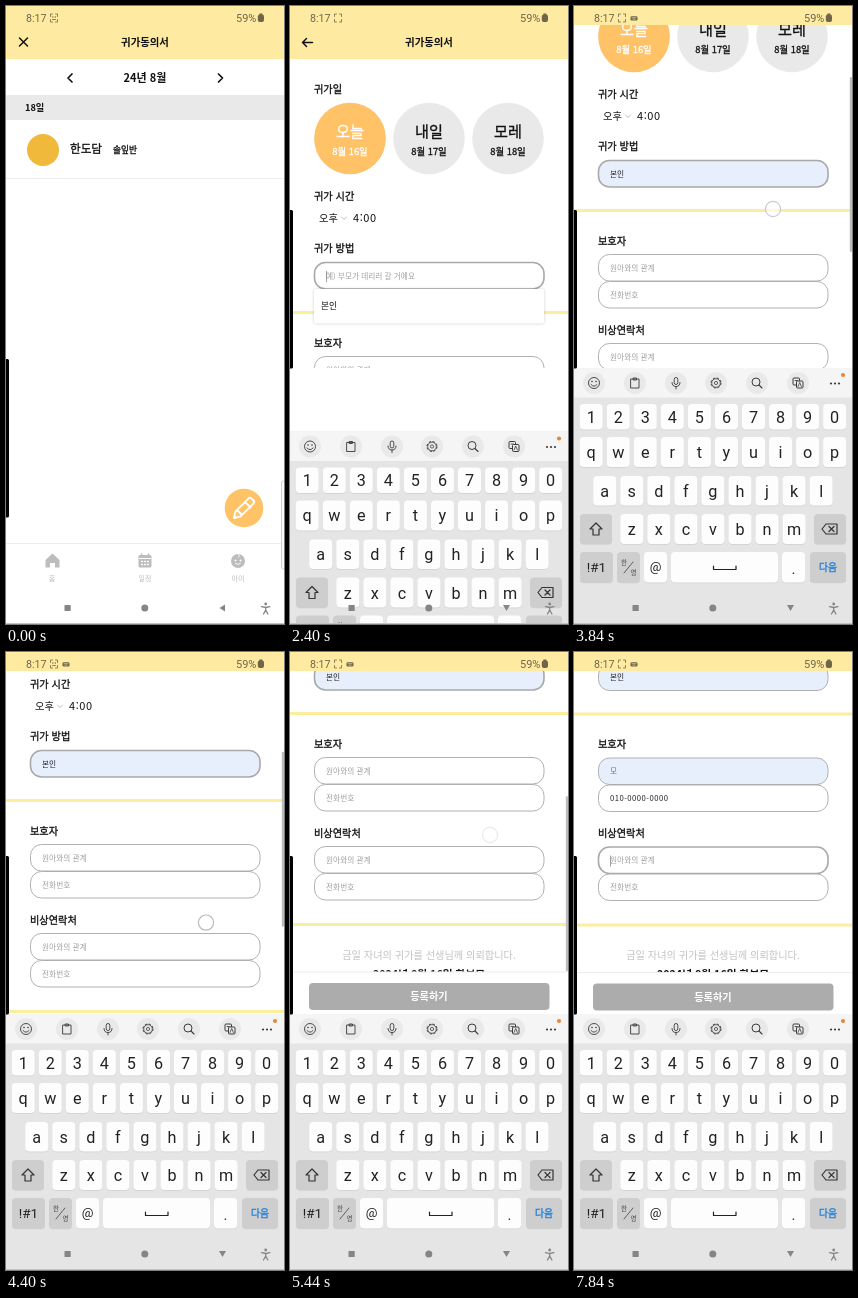
An HTML page that plays this animation: 278 px wide and 618 px high, repeating every 8000 ms.

```html
<!DOCTYPE html>
<html lang="ko">
<head>
<meta charset="utf-8">
<title>귀가동의서</title>
<style>
html, body { margin: 0; width: 278px; height: 618px; overflow: hidden; background: #fff; }
svg { display: block; font-family: "Noto Sans CJK KR", "Noto Sans CJK", "Noto Sans", sans-serif; }
.latin { font-family: Roboto, "Noto Sans CJK KR", sans-serif; }
.line { fill: none; stroke-linecap: round; stroke-linejoin: round; }
</style>
</head>
<body>
<svg id="stage" width="278" height="618" viewBox="0 0 278 618"></svg>
<script>
const LOOP = 8000, STEP = 80;
const YELLOW = '#ffeaa2', ORANGE = '#ffc266', GRAY = '#e9e9e9';

// Markup helpers; text is placed by its vertical centre.
const rect = (x, y, w, h, fill, more = '') =>
  `<rect x="${x}" y="${y}" width="${w}" height="${h}" fill="${fill}" ${more}/>`;
const disc = (x, y, r, fill, more = '') =>
  `<circle cx="${x}" cy="${y}" r="${r}" fill="${fill}" ${more}/>`;
const ring = (x, y, r, color, width = 1, more = '') =>
  disc(x, y, r, 'none', `stroke="${color}" stroke-width="${width}" ${more}`);
const line = (d, color, width = 1, more = '') =>
  `<path class="line" d="${d}" stroke="${color}" stroke-width="${width}" ${more}/>`;
const shape = (d, fill, more = '') => `<path d="${d}" fill="${fill}" ${more}/>`;
const text = (s, x, y, size, fill = '#111', more = '') =>
  `<text x="${x}" y="${(y + size * .37).toFixed(2)}" font-size="${size}" fill="${fill}" ${more}>${s}</text>`;
// Weight between regular and bold.
const medium = (s, x, y, size, fill = '#111', more = '') =>
  text(s, x, y, size, fill, `stroke="${fill}" stroke-width=".3" ${more}`);
const group = (id, body, more = '') => `<g id="${id}" ${more}>${body}</g>`;
const MID = 'text-anchor="middle"', BOLD = 'font-weight="700"';
const MID_BOLD = `${MID} ${BOLD}`;

const header = icon => rect(0, 18, 278, 35, YELLOW) + line(icon, '#111', 1.5) +
  text('귀가동의서', 139, 36, 10.4, '#111', MID_BOLD);

function listPage() {
  const tab = '#bdbdbd';
  return rect(0, 18, 278, 600, '#fff') +
    header('M13.5 32l8 8M21.5 32l-8 8') +
    line('M66 68l-4 4 4 4M212.5 68l4 4-4 4', '#111', 1.7) +
    text('24년 8월', 139, 71.5, 11, '#111', MID_BOLD) +
    rect(0, 89, 278, 25, GRAY) + text('18일', 19, 102, 9.2, '#111', BOLD) +
    disc(37, 144, 16, '#f0b93c') +
    medium('한도담', 64, 143, 11.6) + medium('솔잎반', 107, 143.5, 8.7) +
    rect(0, 172, 278, 1, '#ededed') +
    disc(238, 502, 19.3, ORANGE) +
    line('M228 512l1.5-6.5 13-13q1.5-1.5 3 0l2 2q1.5 1.5 0 3l-13 13zM239.5 496.5l5 5M231 504l5 5', '#fff', 1.9) +
    rect(0, 537, 278, 1, '#ececec') +
    shape('M39.5 554l7-6.5 7 6.5v7.5h-4.5v-4.5h-5v4.5h-4.5z', tab) +
    rect(132.5, 549, 13, 12.5, tab, 'rx="1.5"') +
    line('M135.5 548v2M142.5 548v2', tab, 1.5) +
    line('M133.5 552.5h11', '#fff') +
    line('M135.5 555.5h7M135.5 558.5h7', '#fff', 1.3, 'stroke-dasharray="1 2"') +
    disc(232, 555, 7, tab) + disc(229.5, 554.5, 1, '#fff') + disc(234.5, 554.5, 1, '#fff') +
    line('M229.5 557.5q2.5 2 5 0M232 548q2 1 1 3', '#fff', .9) +
    text('홈', 46, 572, 7, tab, MID) + text('일정', 139, 572, 7, tab, MID) + text('아이', 232, 572, 7, tab, MID);
}

const day = (x, name, n, fill, ink) => disc(x, 132.5, 35.8, fill) +
  medium(name, x, 125.5, 15.2, ink, MID) + medium(`8월 ${n}일`, x, 145.3, 9.4, ink, MID);

const RELATION = '원아와의 관계', PHONE = '전화번호';
const fields = [[257, '예) 부모가 데리러 갈 거예요'], [351, RELATION], [378, PHONE], [440, RELATION], [467, PHONE]];
const field = ([y, hint], i) => group('field' + i,
  rect(24.5, y - .5, 229.5, 26.5, '#fff', 'rx="11" stroke="#a9a9a9"') + text(hint, 36, y + 13, 7.7) +
  rect(36.3, y + 8, .7, 11, '#777'));

function formPage() {
  const labels = [['귀가일', 83], ['귀가 시간', 190], ['귀가 방법', 242.5], ['보호자', 337], ['비상연락처', 426]];
  return rect(0, 18, 278, 600, '#fff') +
    group('content',
      labels.map(([s, y]) => medium(s, 24, y, 10.2)).join('') +
      day(60, '오늘', 16, GRAY, '#111') + group('picked', day(60, '오늘', 16, ORANGE, '#fff')) +
      day(139, '내일', 17, GRAY, '#111') + day(218, '모레', 18, GRAY, '#111') +
      text('오후', 29, 212, 10.3) +
      line('M51.5 211l2.5 2.5 2.5-2.5', '#aaa', .8) +
      text('4:00', 63, 212, 11, '#111', 'letter-spacing=".6"') +
      rect(0, 305, 278, 3, '#fdee9f') + rect(0, 516, 278, 3, '#fdee9f') +
      fields.map(field).join('') +
      text('금일 자녀의 귀가를 선생님께 의뢰합니다.', 139, 548, 10.2, '#c2c2c2', MID) +
      text('2024년 8월 16일 한보모', 139, 567, 10.7, '#111', MID_BOLD) +
      group('menu', rect(24, 283, 230, 34.5, '#fff', 'rx="2" style="filter:drop-shadow(0 0 1.5px #0003)"') +
        text('본인', 31, 300, 8.7))) +
    group('head', header('M22.5 36.5h-10M16.5 32.5l-4 4 4 4')) +
    group('bar', rect(0, 537, 278, 80, '#fff') + rect(0, 536.5, 278, 1, '#ececec') +
      rect(19, 548, 240.5, 27, '#acacac', 'rx="4"') +
      text('등록하기', 139, 561.3, 10.2, '#fff', MID_BOLD));
}

const key = (x, y, w, h, fill = '#fdfdfd') =>
  rect(x, y + .8, w, h, '#d0d0d0', 'rx="4"') + rect(x, y, w, h, fill, 'rx="4"');
const keyRow = (chars, x0, top, h, base) => [...chars].map((c, i) => {
  const x = x0 + i * 27.05;
  return key(x - 11.5, top, 23, h) +
    `<text x="${x}" y="${base}" font-size="16.2" fill="#222" ${MID}>${c}</text>`;
}).join('');

function toolbar() {
  const ink = '#3c3c3c', spot = '#e9e9e9', y = 377;
  return rect(0, 362, 278, 29.5, '#f5f5f5') +
    [20, 61, 102, 142, 183, 224].map(x => disc(x, y, 11, spot)).join('') +
    ring(20, y, 5.5, ink, .9) + disc(18, 375.5, .8, ink) + disc(22, 375.5, .8, ink) +
    line('M17 378.5q3 3.5 6 0', ink, .9) +
    line('M57 373h8v9h-8zM59.5 372h3v2h-3z', ink, .9) +
    rect(100.2, 371.5, 3.6, 7, 'none', `rx="1.8" stroke="${ink}" stroke-width=".9"`) +
    line('M98 376.5q0 4 4 4t4-4M102 380.5v2.5', ink, .9) +
    ring(142, y, 5, ink, 1, 'stroke-dasharray="2.3 1.627"') +
    ring(142, y, 4.3, ink, .8) + ring(142, y, 1.6, ink, .8) +
    ring(182, 376, 4, ink) + line('M185 379l3 3', ink, 1.1) +
    rect(219, 372, 6.5, 7, 'none', `stroke="${ink}" rx="1"`) +
    rect(222.5, 375, 6.5, 7, spot, `stroke="${ink}" rx="1"`) +
    line('M224 380.5l1.7-4 1.7 4M221 374.5h2.5', ink, .8) +
    [257, 261, 265].map(x => disc(x, 377.5, 1.1, ink)).join('') + disc(269, 369, 2.1, '#e8863a');
}

function keyboard() {
  const dark = '#cecece';
  return rect(0, 362, 278, 256, '#e5e5e5') + toolbar() +
    `<g class="latin">` +
    keyRow('1234567890', 17.2, 398, 25.5, 416.5) + keyRow('qwertyuiop', 17.2, 431, 30, 451.5) +
    keyRow('asdfghjkl', 30.7, 470, 29.5, 490.5) + keyRow('zxcvbnm', 57.8, 508, 30, 529) +
    key(6, 508, 32, 30, dark) + key(240, 508, 32, 30, dark) +
    line('M22 517l6 6h-3v6h-6v-6h-3z', '#333', 1.2) +
    line('M248 523l4-5h11v10h-11zM255 520.5l5 5M260 520.5l-5 5', '#333', 1.2) +
    key(6, 546, 33, 30.5, dark) + text('!#1', 22.5, 561, 13.5, '#222', MID) +
    key(43, 546, 23, 30.5, dark) + text('한', 50, 556.5, 6.5, '#444', MID) +
    line('M50 567l9-11', '#444', .8) + text('영', 59.5, 566.5, 6.5, '#444', MID) +
    key(70, 546, 23, 30.5) + text('@', 81.5, 560.5, 13, '#222', MID) +
    key(97, 546, 107, 30.5) + line('M139.5 560v3.5h22.5v-3.5', '#222', 1.2) +
    key(208, 546, 23, 30.5) + text('.', 219.5, 562, 15, '#222', MID) +
    key(236, 546, 36, 30.5, dark) + medium('다음', 254, 561, 9.8, '#1c7fe0', MID) + '</g>';
}

function system() {
  const ink = '#6f664a', nav = '#858585';
  return rect(0, 0, 278, 19, YELLOW) +
    `<g class="latin">` + text('8:17', 20, 12, 10.7, ink) + text('59%', 230, 12, 11, ink) + '</g>' +
    line('M44.5 10.5v-2.5h2M49.5 8h2v2.500M51.5 13.5v2.5h-2M46.5 16h-2v-2.5', ink, .8) +
    group('scan', disc(46.8, 11, .7, ink) + disc(49.3, 11, .7, ink) + line('M46.5 13.500h3', ink, .8)) +
    group('kbIcon', rect(56.5, 10.3, 7, 4.2, ink, 'rx="1.2"') + line('M58 11.7h4M59 13.2h2', YELLOW, .6)) +
    rect(251.8, 8.5, 6.2, 7.5, ink, 'rx="2"') + rect(253.4, 7.5, 3, 1.5, ink) +
    rect(58.5, 599, 6.2, 6, nav, 'rx=".5"') + disc(138.8, 602, 3.5, nav) +
    shape('M213.5 602l5.5-3.5v7z', nav, 'id="back"') + shape('M213 599h7l-3.5 6z', nav, 'id="down"') +
    disc(259.7, 598, 1.4, nav) + line('M255.5 600.7l4.2.8 4.2-.8M259.7 601.5v2.5l-2.2 4M259.7 604l2.2 4', nav, 1.3) +
    rect(0, 617, 278, 1, '#c4c4c4') +
    rect(-3, 353, 6, 158.5, '#000', 'rx="1.5" id="edge"');
}

const stage = document.getElementById('stage');
stage.innerHTML =
  '<clipPath id="view"><rect id="viewBox" y="18" width="278" height="600"/></clipPath>' +
  rect(0, 0, 278, 618, '#fff') +
  group('form', formPage(), 'clip-path="url(#view)"') +
  group('list', listPage()) +
  rect(275.5, 475, 6, 88, '#fafafa', 'rx="2" stroke="#cfcfcf" id="handle"') +
  rect(275.8, 19, 2.2, 175, '#bcbcbc', 'rx="1" id="thumb"') +
  group('keys', keyboard()) + system() +
  disc(0, 0, 7.6, '#fff', 'id="touch" fill-opacity=".8" stroke="#b9bcc4" stroke-width="1.2"');

const $ = id => document.getElementById(id);
const show = (id, on) => $(id).setAttribute('opacity', +on);
const shiftY = (id, y) => $(id).setAttribute('transform', `translate(0 ${y.toFixed(2)})`);
const within = (t, a, b) => t >= a && t < b;

// Piecewise linear track of [time, value] points.
function track(t, points) {
  if (t <= points[0][0]) return points[0][1];
  for (let i = 1; i < points.length; i++) {
    const [a, u] = points[i - 1], [b, v] = points[i];
    if (t < b) return u + (v - u) * (t - a) / (b - a);
  }
  return points[points.length - 1][1];
}

const SCROLL = [[3440, 0], [3520, 8], [3840, 102], [3920, 122], [4080, 145], [4320, 152],
  [4400, 158], [4720, 241], [4800, 245], [5440, 245], [5680, 244.5]];
const PULL = [[4560, 0], [4720, 5], [5040, 5], [5200, 0], [5440, 0], [5680, -.5]];
const RISE = [[2160, 256], [2240, 205], [2320, 120], [2400, 63.5], [2480, 26], [2560, 8], [2640, 0]];

// Each touch: start, end, x, vertical track.
const TOUCHES = [
  [480, 760, 238, [[0, 505]]],
  [1440, 1760, 60, [[0, 135]]],
  [2000, 2280, 152, [[0, 270]]],
  [2880, 3200, 120, [[0, 300]]],
  [3440, 4080, 199, [[3440, 308], [3840, 203], [3920, 183]]],
  [4320, 5560, 200, [[4320, 290], [4720, 193], [4880, 184], [5200, 183]]],
  [5840, 6160, 190, [[0, 147]]],
  [7200, 7520, 182, [[0, 204]]]
];

function setField(i, value, { blue, focus, caret, ink = '#222' } = {}) {
  const [box, label, bar] = $('field' + i).children;
  box.setAttribute('fill', blue ? '#e8effc' : '#fff');
  box.setAttribute('stroke-width', focus ? 1.6 : .9);
  label.textContent = value || fields[i][1];
  label.setAttribute('fill', value ? ink : '#a0a0a0');
  label.setAttribute('letter-spacing', value.length > 3 ? .47 : 0);
  bar.setAttribute('x', value.length > 3 ? 94.3 : 36.3);
  bar.setAttribute('opacity', caret ? 1 : 0);
}

function draw(t) {
  const scroll = track(t, SCROLL), pan = Math.min(scroll, 217 + track(t, PULL));
  const typing = t >= 2240, chosen = t >= 3040, filled = t >= 5920, last = t >= 7360;

  show('list', track(t, [[640, 1], [1040, 0]]));
  show('picked', track(t, [[1480, 0], [1680, 1]]));
  show('menu', within(t, 2320, 3040));
  shiftY('content', -scroll);
  shiftY('head', -pan);
  shiftY('bar', -pan);
  $('viewBox').setAttribute('height', typing ? 344 : 600);

  setField(0, chosen ? '본인' : '', { blue: chosen, focus: within(t, 2160, 5920), caret: within(t, 2240, 2720) });
  setField(1, filled ? '모' : '', { blue: filled, ink: '#777' });
  setField(2, filled ? '010-0000-0000' : '',
    { focus: filled && !last, caret: within(t, 6160, 6640) || within(t, 7040, 7360) });
  setField(3, '', { focus: last, caret: last });
  setField(4, '');

  shiftY('keys', track(t, RISE));
  show('keys', t >= 2160);
  show('handle', !typing);
  show('thumb', track(t, [[3440, 0], [3520, 1], [5520, 1], [5760, 0]]));
  shiftY('thumb', scroll * .511);
  shiftY('edge', typing ? -149 : 0);
  show('back', !typing);
  show('down', typing);
  show('kbIcon', t >= 2640);
  show('scan', t < 1280 || within(t, 4320, 5200) || within(t, 6320, 6880));

  const hit = TOUCHES.find(([a, b]) => within(t, a, b));
  show('touch', 0);
  if (hit) {
    const [a, b, x, path] = hit;
    show('touch', Math.min(1, (b - t) / Math.min(400, (b - a) / 2)));
    $('touch').setAttribute('cx', x);
    $('touch').setAttribute('cy', track(t, path));
  }
}

const start = performance.now();
function tick() {
  const t = (performance.now() - start) % LOOP;
  draw(Math.floor(t / STEP) * STEP);
  requestAnimationFrame(tick);
}
tick();
</script>
</body>
</html>
```
